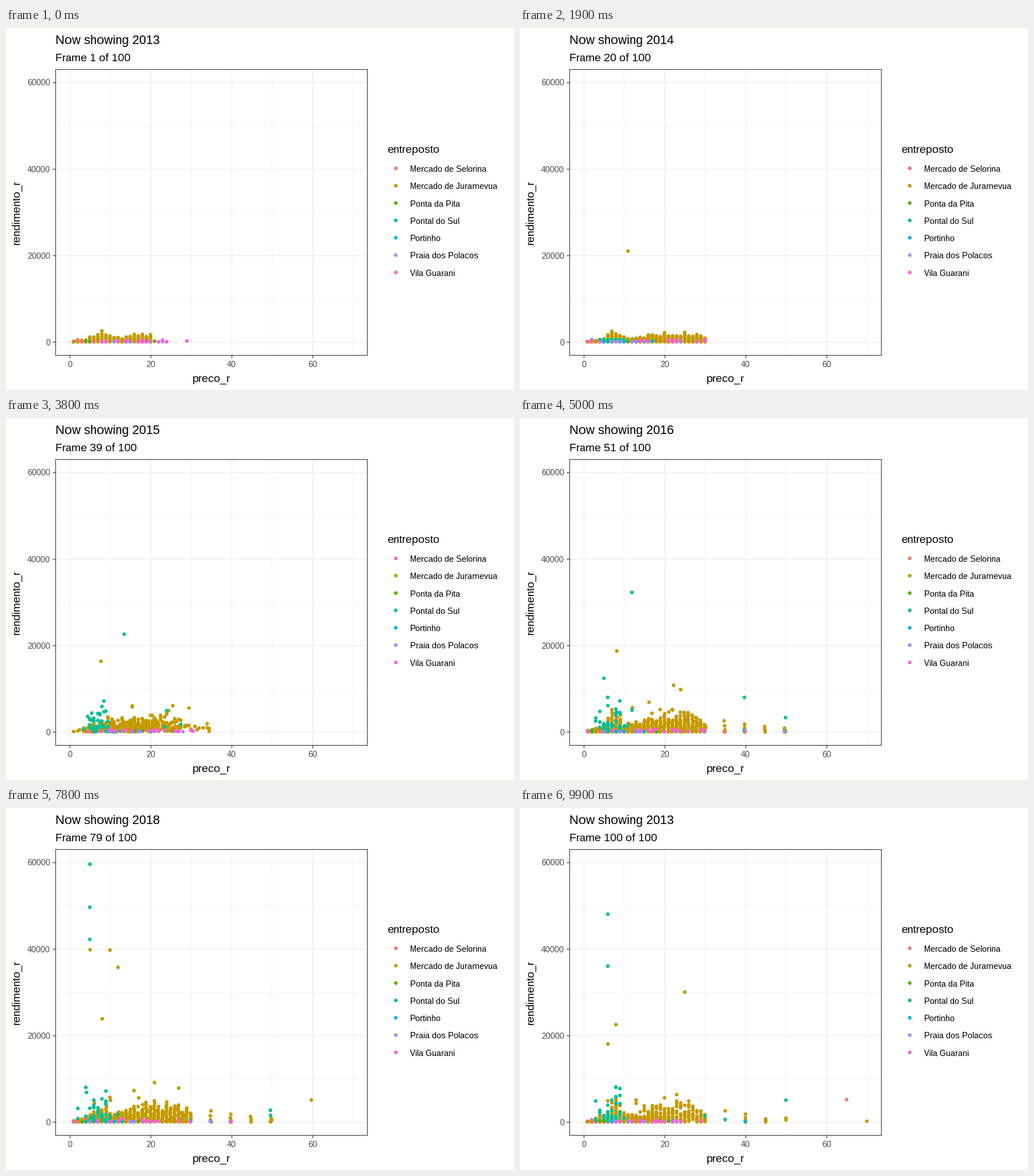
A matplotlib script that plays this animation: 885 px wide and 632 px high, repeating every 10 s.

```python
import numpy as np
import matplotlib.pyplot as plt
from matplotlib.animation import FuncAnimation

# crisp, pixel-fitted lettering
plt.rcParams.update({"font.family": "Liberation Sans",
                     "text.hinting": "no_autohint", "text.hinting_factor": 1})
W, H, DPI = 885, 632, 100
PX = 72 / DPI
FRAMES, MOVE = 100, 8
FIRST, LAST = 2013, 2019
STARTS = [6, 21, 35, 50, 64, 78, 92]

NAMES = ["Mercado de Selorina", "Mercado de Juramevua", "Ponta da Pita",
         "Pontal do Sul", "Portinho", "Praia dos Polacos", "Vila Guarani"]
COLORS = ["#F8766D", "#C49A00", "#53B400", "#00C094", "#00B6EB", "#A58AFF", "#FB61D7"]
SALMON, GOLD, GREEN, TEAL, BLUE, PURPLE, PINK = range(7)
LAYERS = [GOLD, SALMON, TEAL, GREEN, BLUE, PURPLE, PINK]

# count, usual price, price spread, mean income in thousands
MINOR = {SALMON: (11, 5, 3, .15), GREEN: (8, 14, 6, .12), TEAL: (44, 7, 2, 2),
         BLUE: (7, 9, 4, .08), PURPLE: (8, 15, 8, .1), PINK: (16, 18, 8, .25)}

# the few sales that stand out: colour, price, income in thousands
PEAKS = {
    2013: [(GOLD, 11, .3)],
    2014: [(GOLD, 11, 21)],
    2015: [(GOLD, 7.5, 13.9), (GOLD, 37, .2), (GOLD, 28, 9), (TEAL, 15, 12.7)],
    2016: [(TEAL, 12, 32.5), (TEAL, 5, 12.5), (GOLD, 8, 18.8), (GOLD, 22, 10.9)],
    2017: [(PINK, 21, 14.7), (SALMON, 8, 9.6), (GOLD, 36, 10.8), (GOLD, 55, .2)],
    2018: [(TEAL, 5, 60), (TEAL, 5, 50), (TEAL, 5, 42.5), (GOLD, 5, 40.1),
           (GOLD, 10, 40), (GOLD, 12, 36), (GOLD, 8, 24), (GOLD, 60, 5.1)],
    2019: [(TEAL, 6, 48), (TEAL, 6, 36), (GOLD, 25, 30), (GOLD, 8, 22.5),
           (GOLD, 6, 18), (GOLD, 70, .2), (SALMON, 65, 5.2)],
}

rng = np.random.default_rng(7)


def hump(x, mid, width):
    return np.exp(-((x - mid) / width) ** 2)


def gold_rows(year):
    """Stacks on whole prices, dense near zero, plus scattered high sales."""
    early = year < 2015
    x = np.arange(1, 21 if year == FIRST else 31)
    top = .25 * np.minimum(x, 4) + 3.6 * hump(x, 7.5, 2.2) + 3.4 * hump(x, 22, 9)
    top = top * rng.uniform(.55, 1.15, len(x)) * (.5 if early else 1)
    size = 6 if year == FIRST else 12
    rise = np.linspace(.02, 1, size) ** 1.5
    rows = [(a, .05 + b * r) for a, b in zip(x, top) for r in rise]
    if not early:
        rows += zip(rng.integers(5, 29, 14), 3.5 + rng.exponential(2, 14))
    if year > 2015:
        rows += [(35 + 5 * i, 3.5 * .7 ** i * r) for i in range(4) for r in rise[::3]]
    return rng.permutation(rows)


def minor_rows(year, color):
    count, price, spread, income = MINOR[color]
    if year == FIRST and color in (TEAL, BLUE):
        return np.empty((0, 2))
    x = np.clip(np.round(rng.normal(price, spread, count)), 1, 30)
    y = .05 + np.minimum(rng.exponential(income, count), 4 * income)
    if year < 2015:
        y = np.minimum(y, .5)
    if year > 2015:
        far = max(1, count // 10)
        x[:far] = rng.choice([30, 35, 40, 50], far)
    return rng.permutation(np.column_stack([x, y]))


def year_rows(year):
    out = []
    for c in range(7):
        bulk = gold_rows(year) if c == GOLD else minor_rows(year, c)
        peaks = np.array([p[1:] for p in PEAKS[year] if p[0] == c]).reshape(-1, 2)
        # closing the loop, the last peaks must stay put
        out.append(np.vstack([bulk, peaks] if year == LAST else [peaks, bulk]))
    return out


states = [year_rows(y) for y in range(FIRST, LAST + 1)]


def ease(p):
    return 4 * p ** 3 if p < .5 else 1 - 4 * (1 - p) ** 3


def points_at(k, e):
    """Matched rows travel; surplus rows wait for the end of the move."""
    out = []
    for c in LAYERS:
        a, b = states[k][c].copy(), states[(k + 1) % 7][c]
        m = min(len(a), len(b))
        a[:m] += (b[:m] - a[:m]) * e
        out.append(a)
    return out


fig = plt.figure(figsize=(W / DPI, H / DPI), dpi=DPI, facecolor="white")
LEFT, RIGHT, TOP, BOTTOM = 86, 629, 72, 571
ax = fig.add_axes([LEFT / W, 1 - BOTTOM / H, (RIGHT - LEFT) / W, (BOTTOM - TOP) / H])
ax.set(xlim=(-3.5, 73.5), ylim=(-3, 63))
ax.set_xticks(range(0, 61, 20))
ax.set_xticks(range(10, 71, 20), minor=True)
ax.set_yticks(range(0, 61, 20))
ax.set_yticks(range(10, 51, 20), minor=True)
ax.set_axisbelow(True)
ax.grid(which="major", color="#EBEBEB", lw=1.36 * PX)
ax.grid(which="minor", color="#EBEBEB", lw=.7 * PX)
ax.tick_params(which="major", length=4.6 * PX, width=1.2 * PX, color="#333333",
               labelbottom=False, labelleft=False)
ax.tick_params(which="minor", length=0)
for spine in ax.spines.values():
    spine.set(color="#333333", linewidth=1.1 * PX)


def label(x, y, text, size=15, color="black", **kw):
    return fig.text(x / W, 1 - y / H, text, fontsize=size * PX, color=color,
                    va="baseline", **kw)


title = label(86, 28, "", 22)
subtitle = label(86, 58, "", 19)
for v in range(0, 61, 20):
    label(111 + v * 7.052, 592, str(v), color="#4D4D4D", ha="center")
    label(77, 554 - v * 7.56, str(v * 1000), color="#4D4D4D", ha="right")
label(358, 618, "preco_r", 19, ha="center")
label(24, 322, "rendimento_r", 19, ha="center", rotation=90, rotation_mode="anchor")

label(664, 218, "entreposto", 19)
DOT = (6.4 * PX) ** 2
key = fig.add_axes([0, 0, 1, 1], frameon=False, xlim=(0, W), ylim=(H, 0))
key.axis("off")
rows = 245 + 30.3 * np.arange(7)
key.scatter([679] * 7, rows, s=DOT, c=COLORS, lw=0)
for y, name in zip(rows, NAMES):
    label(704, y + 6, name)

dots = ax.scatter([], [], s=DOT, lw=0, zorder=2)


def draw(i):
    n = i + 1
    k = sum(n >= s + MOVE for s in STARTS[:-1])
    p = min(max((n - STARTS[k]) / MOVE, 0), 1)
    layers = points_at(k, ease(p))
    dots.set_offsets(np.vstack(layers))
    dots.set_facecolor(np.repeat([COLORS[c] for c in LAYERS], [len(a) for a in layers]))
    title.set_text(f"Now showing {FIRST + (k + (p > .5)) % 7}")
    subtitle.set_text(f"Frame {n} of {FRAMES}")
    return dots, title, subtitle


anim = FuncAnimation(fig, draw, frames=FRAMES, interval=100, repeat=True, repeat_delay=0)
plt.show()
```
